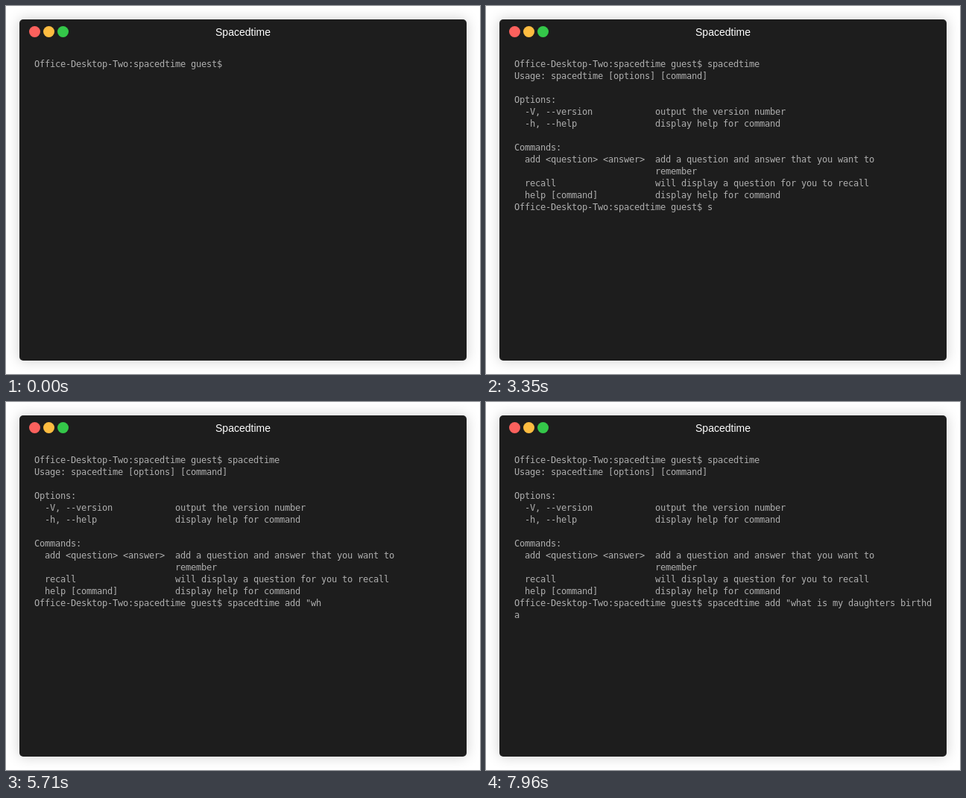
These frames come from a looping animation (636 by 494 pixels, 8000 ms). An HTML page with a canvas:

```html
<!DOCTYPE html>
<html lang="en">
<head>
<meta charset="utf-8">
<title>Spacedtime</title>
<style>
  html, body { margin: 0; width: 636px; height: 494px; overflow: hidden; background: #fff; }
  canvas { display: block; }
</style>
</head>
<body>
<canvas id="stage" width="636" height="494"></canvas>
<script>
const ctx = document.getElementById('stage').getContext('2d');

const LOOP = 8000;
const COLUMNS = 80;
const CELL = { width: 7, height: 16 };
const ORIGIN = { x: 38, y: 82 };
const PROMPT = 'Office-Desktop-Two:spacedtime guest$ ';

const HELP = [
  'Usage: spacedtime [options] [command]',
  '',
  'Options:',
  '  -V, --version            output the version number',
  '  -h, --help               display help for command',
  '',
  'Commands:',
  '  add <question> <answer>  add a question and answer that you want to',
  '                           remember',
  '  recall                   will display a question for you to recall',
  '  help [command]           display help for command'
];

// Evenly spaced key presses, on a 10 ms grid.
function even(from, to, count) {
  const step = (to - from) / (count - 1);
  return Array.from({ length: count }, (_, i) => Math.round((from + i * step) / 10) * 10);
}

// A space appears together with the letter that follows it.
function command(text, times) {
  const strokes = text.match(/\s*\S/g);
  return now => strokes.slice(0, times.filter(time => time <= now).length).join('');
}

const HELP_TIME = 2360;

const runHelp = command('spacedtime', [
  ...even(1330, 1650, 5), 1850, ...even(2110, HELP_TIME, 5).slice(0, 4)
]);

const runAdd = command('spacedtime add "what is my daughters birthda', [
  ...even(3350, 3590, 5), 3750, 4040, 4130, 4190, 4370,
  4940, 5090, 5190,
  5420, 5640, 5710, ...even(5770, 5990, 5), 6170,
  6710, 6800, ...even(6890, 7190, 6), 7390,
  7560, 7640, 7720, 7800, 7800, 7880, 7960
]);

function linesAt(now) {
  const lines = [PROMPT + runHelp(now)];
  if (now >= HELP_TIME) {
    const input = PROMPT + runAdd(now);
    lines.push(...HELP, input.slice(0, COLUMNS), input.slice(COLUMNS));
  }
  return lines;
}

function drawWindow() {
  ctx.fillStyle = '#fff';
  ctx.fillRect(0, 0, 636, 494);

  ctx.save();
  ctx.shadowColor = 'rgba(0, 0, 0, 0.2)';
  ctx.shadowBlur = 18;
  ctx.fillStyle = '#1d1d1d';
  ctx.beginPath();
  ctx.roundRect(18, 18, 600, 458, 5);
  ctx.fill();
  ctx.restore();

  ['#fc615d', '#fdbc40', '#34c749'].forEach((color, i) => {
    ctx.fillStyle = color;
    ctx.beginPath();
    ctx.arc(38.5 + 19 * i, 34.5, 7.5, 0, Math.PI * 2);
    ctx.fill();
  });

  ctx.fillStyle = '#fff';
  ctx.font = '14px "Liberation Sans", Arial, sans-serif';
  ctx.textAlign = 'center';
  ctx.fillText('Spacedtime', 318, 40);
}

function drawText(lines) {
  ctx.fillStyle = '#afafaf';
  ctx.font = '12px "DejaVu Sans Mono", monospace';
  ctx.textAlign = 'left';
  lines.forEach((line, row) => {
    [...line].forEach((char, column) => {
      ctx.fillText(char, ORIGIN.x + column * CELL.width, ORIGIN.y + row * CELL.height);
    });
  });
}

function draw(now) {
  drawWindow();
  drawText(linesAt(now % LOOP));
  requestAnimationFrame(draw);
}

draw(0);
</script>
</body>
</html>
```
